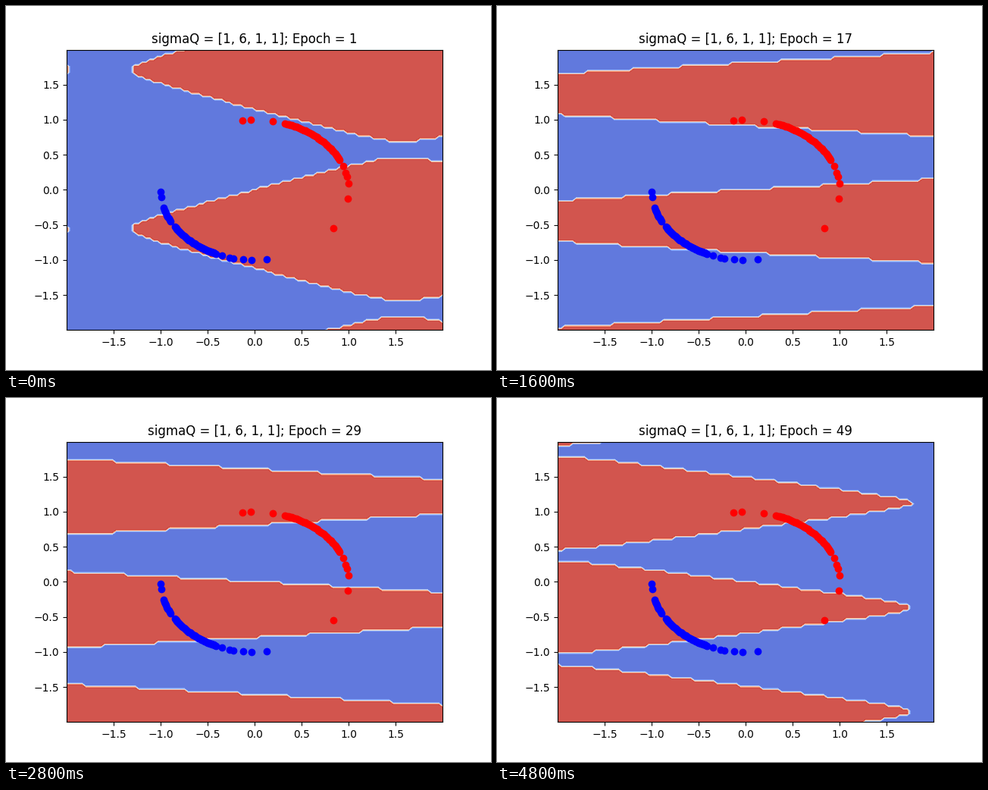
Write a matplotlib script that moves like this. It is 640x480 px and loops after 5000 ms.

```python
import numpy as np
import matplotlib.pyplot as plt
from matplotlib.animation import FuncAnimation

FRAMES, INTERVAL = 25, 200
BIAS = 0.026
LIMIT = 1.999  # just inside 2, so no tick falls on the corners

# Training moves on in these frames and rests in between.
MOVES = np.array([3, 4, 5, 6, 7, 10, 11, 12, 13, 15, 18])
KEY_MOVES = [0, 1, 4, 6, 8, 10, 11]
KEY_WX = [0.975, 0.687, 0.453, 0.078, -0.157, -0.425, -0.720]
KEY_WY = [2.770, 3.120, 3.322, 3.626, 3.806, 4.013, 4.220]

axis = np.linspace(-LIMIT, LIMIT, 100)
xx, yy = np.meshgrid(axis, axis)


def weights(frame):
    moves_done = np.sum(MOVES <= frame)
    return (np.interp(moves_done, KEY_MOVES, KEY_WX),
            np.interp(moves_done, KEY_MOVES, KEY_WY))


def classify(frame):
    wx, wy = weights(frame)
    score = np.sin(wx * xx + BIAS) - np.sin(wy * yy - BIAS)
    return (score > 2 * np.sin(BIAS)).astype(float)


def plot_arc(ax, color, start, stop, strays):
    """A dense run of dots on the unit circle plus a few stray ones."""
    angle = np.radians(np.append(np.linspace(start, stop, 45), strays))
    ax.plot(np.cos(angle), np.sin(angle), "o", color=color)


fig, ax = plt.subplots(figsize=(6.4, 4.8), dpi=100)
regions = None


def draw(frame):
    global regions
    if regions is not None:
        regions.remove()
    regions = ax.contourf(xx, yy, classify(frame), cmap="coolwarm", alpha=0.9)
    ax.set_title(f"sigmaQ = [1, 6, 1, 1]; Epoch = {1 + 2 * frame}")
    return []


plot_arc(ax, "red", 25.5, 71,
         [97.5, 92.3, 79, 19.6, 14, 11, 5.2, -7.5, -33])
plot_arc(ax, "blue", 212, 245.5,
         [181.6, 186.2, *np.linspace(195, 207, 9),
          249.5, 254.7, 257.1, 263.1, 268.2, 277.6])
ax.set(xlim=(-LIMIT, LIMIT), ylim=(-LIMIT, LIMIT))

anim = FuncAnimation(fig, draw, frames=FRAMES, interval=INTERVAL,
                     repeat=True, repeat_delay=0)
plt.show()
```
